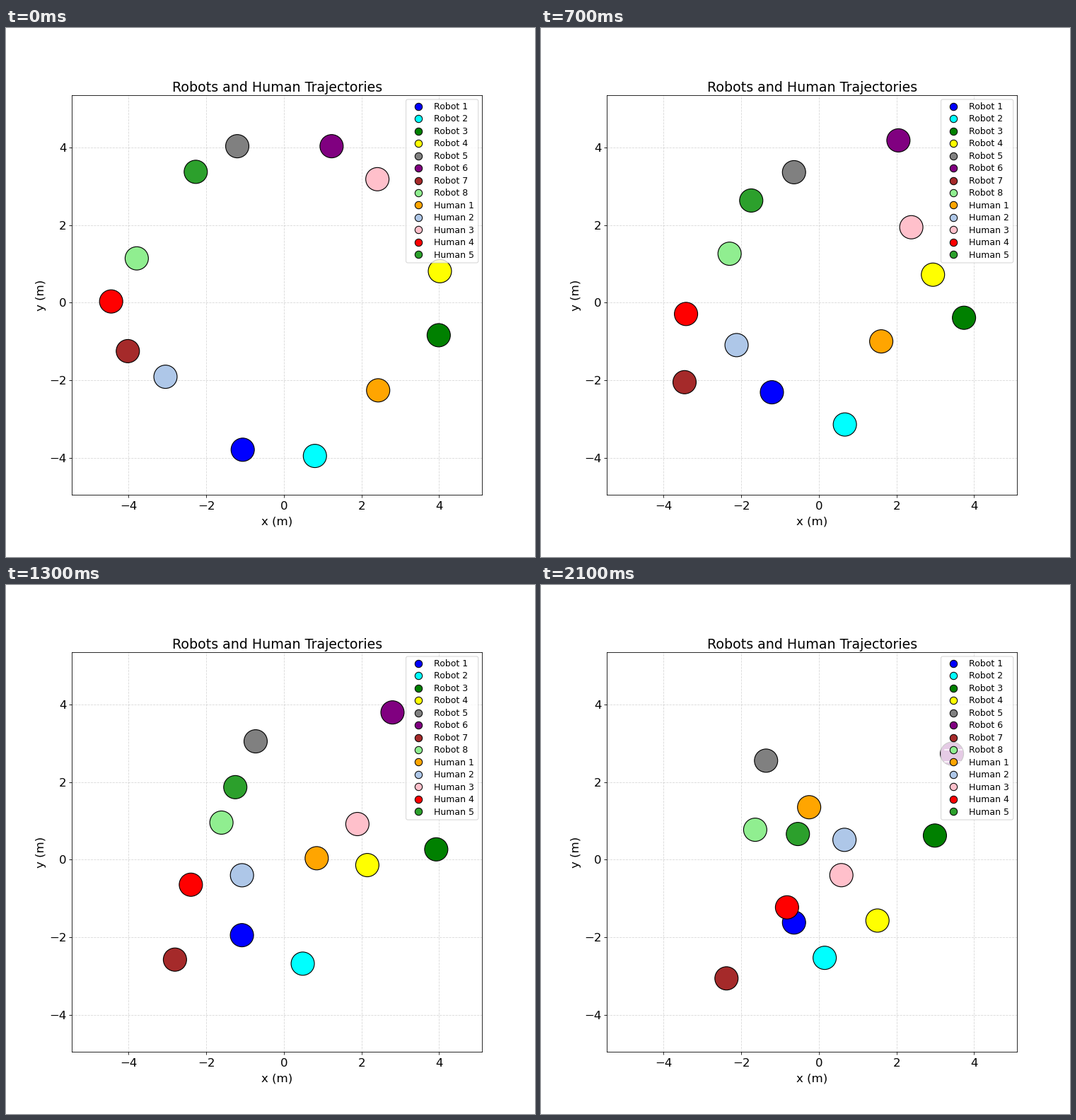
Animation of 748 by 748 pixels, one loop 2.2 s. Source, as a matplotlib script:

```python
import matplotlib.pyplot as plt
import numpy as np
from matplotlib.animation import FuncAnimation
from matplotlib.patches import Circle, FancyBboxPatch

SIZE = 748
FRAMES = 22
RADIUS = 0.3

# Key positions in metres, evenly spaced over the loop
ROBOTS = {
    "blue": [(-1.06, -3.79), (-1.21, -2.31), (-1.04, -1.92), (-0.64, -1.62)],
    "cyan": [(0.80, -3.95), (0.67, -3.14), (0.45, -2.63), (0.15, -2.53)],
    "green": [(3.99, -0.84), (3.74, -0.39), (3.92, 0.36), (2.99, 0.62)],
    "yellow": [(4.02, 0.81), (2.94, 0.72), (2.04, -0.32), (1.51, -1.57)],
    "gray": [(-1.20, 4.03), (-0.64, 3.36), (-0.78, 3.00), (-1.36, 2.55)],
    "purple": [(1.23, 4.03), (2.05, 4.18), (2.91, 3.69), (3.43, 2.73)],
    "brown": [(-4.02, -1.25), (-3.46, -2.05), (-2.71, -2.65), (-2.38, -3.06)],
    "lightgreen": [(-3.79, 1.14), (-2.30, 1.26), (-1.55, 0.90), (-1.64, 0.77)],
}
HUMANS = {
    "orange": [(2.43, -2.26), (1.17, -0.39), (-0.25, 1.35)],
    "#aec7e8": [(-3.05, -1.91), (-1.54, -0.69), (0.66, 0.51)],
    "pink": [(2.41, 3.18), (2.15, 1.34), (0.58, -0.40)],
    "red": [(-4.45, 0.03), (-2.84, -0.49), (-0.82, -1.23)],
    "#2ca02c": [(-2.27, 3.37), (-1.46, 2.20), (-0.54, 0.66)],
}


def track(points):
    """Smooth polynomial path through the key positions, one row per step."""
    keys = np.linspace(0, 1, len(points))
    coeffs = np.polyfit(keys, np.array(points), len(points) - 1)
    u = np.linspace(0, 1, FRAMES)
    return np.column_stack([np.polyval(c, u) for c in coeffs.T])


def draw_legend(fig, entries):
    """Legend on a full-stage layer measured in pixels."""
    layer = fig.add_axes([0, 0, 1, 1])
    layer.set(xlim=(0, SIZE), ylim=(SIZE, 0))
    layer.axis("off")
    layer.add_patch(FancyBboxPatch(
        (565.6, 101), 102.2, 231, boxstyle="round,pad=0,rounding_size=2.5",
        fc="white", ec="0.8", lw=1, alpha=0.8))
    for k, (label, color) in enumerate(entries):
        y = 110.8 + 17.46 * k
        layer.plot([570.6, 595.5], [y, y], color="white", lw=1.5)
        layer.plot(583, y, "o", ms=10, mfc=color, mec="black", mew=1)
        layer.text(605, y + 4.2, label, fontsize=12, va="baseline")


plt.rcParams["font.family"] = "DejaVu Sans"
fig, ax = plt.subplots(figsize=(10, 10), dpi=SIZE / 10)
fig.subplots_adjust(left=0.1245)
ax.set_aspect("equal")
ax.set(xlim=(-5.462, 5.108), ylim=(-4.955, 5.34))
ax.set_xticks(range(-4, 5, 2))
ax.set_yticks(range(-4, 5, 2))
ax.tick_params(labelsize=16)
ax.tick_params(axis="x", pad=5)
ax.grid(linestyle="--", alpha=0.5)
ax.set_title("Robots and Human Trajectories", fontsize=18.25, pad=5.4)
ax.set_xlabel("x (m)", fontsize=16, labelpad=5.8)
ax.set_ylabel("y (m)", fontsize=16)

agents, entries = [], []
for kind, group in (("Robot", ROBOTS), ("Human", HUMANS)):
    for n, (color, points) in enumerate(group.items(), 1):
        disc = Circle(points[0], RADIUS, fc=color, ec="black", lw=1.1, zorder=3)
        ax.add_patch(disc)
        agents.append((disc, track(points)))
        entries.append((f"{kind} {n}", color))
draw_legend(fig, entries)


def update(step):
    for disc, path in agents:
        disc.center = path[step]
    return [disc for disc, _ in agents]


anim = FuncAnimation(fig, update, frames=FRAMES, interval=100,
                     repeat=True, repeat_delay=0, blit=False)
plt.show()
```
